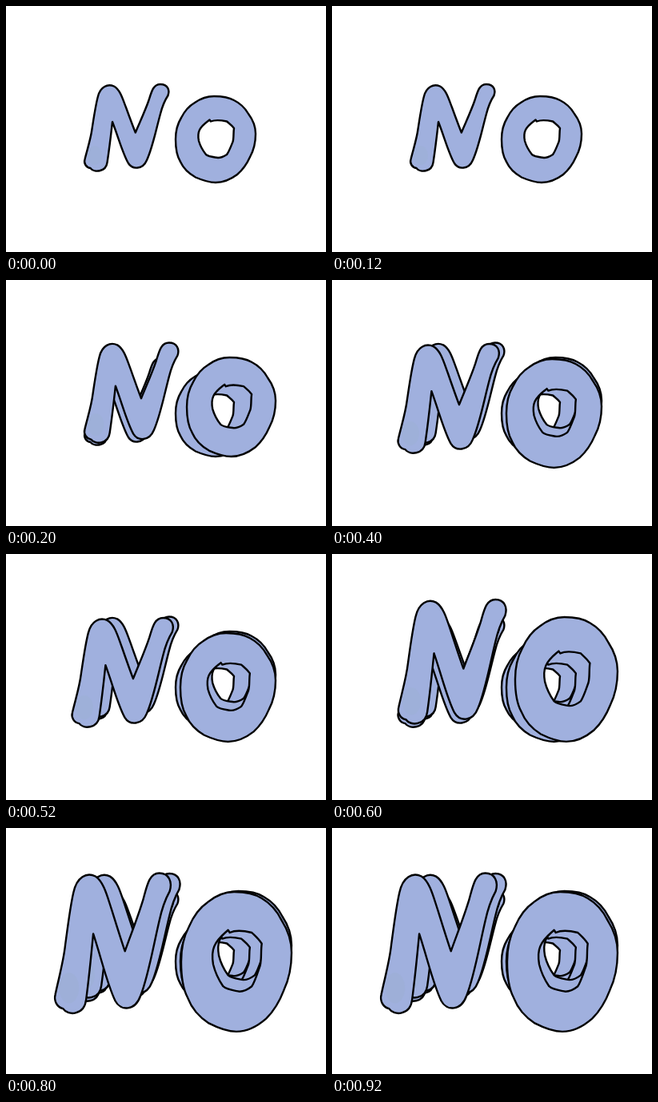
These frames come from a looping animation (400x308 px, 1 s). An HTML page:

```html
<!DOCTYPE html>
<html lang="en">
<head>
<meta charset="utf-8">
<title>NO</title>
<style>
  html, body { margin: 0; width: 100%; height: 100%; overflow: hidden; background: #fff; }
  svg { display: block; width: 100vw; height: 100vh; }
  .ink {
    fill: #a0b0de; fill-rule: evenodd;
    stroke: #000; stroke-width: 2.4; stroke-linejoin: round;
    vector-effect: non-scaling-stroke;
  }
  .smudge { fill: #9db0d6; opacity: .6; }
  .layer { animation: 1s step-end infinite; }
  .l1 { animation-name: at1; }
  .l2 { animation-name: at2; }
  .l3 { animation-name: at3; }
  .l4 { animation-name: at4; }
  @keyframes at1 { 0% { opacity: 0 } 20%, 100% { opacity: 1 } }
  @keyframes at2 { 0% { opacity: 0 } 40%, 100% { opacity: 1 } }
  @keyframes at3 { 0% { opacity: 0 } 60%, 100% { opacity: 1 } }
  @keyframes at4 { 0% { opacity: 0 } 80%, 100% { opacity: 1 } }
</style>
</head>
<body>
<svg viewBox="0 0 400 308" role="img" aria-label="NO">
  <defs>
    <g id="n">
      <path class="ink" d="M98.5 192 C102 178 106 166 107.5 154 C110 138 112 124 115 113 C118 101 127 97 135 100.5
        C143 105 146 117 150 127 C154 138 158 149 161.8 158.5 C167 146 174 131 178.5 118 C182 107 184 98 193 98
        C202 98 205 105 202.5 112 C198 119 195 127 193 135 C187 157 183 178 176 193 C171 205 158 205 153 197
        C146 185 141 166 133 145 C131 163 129 180 126.5 196 C125 208 110 209 105.5 203 C100 202 97 197 98.5 192Z"/>
      <ellipse class="smudge" cx="111" cy="187" rx="9" ry="12"/>
    </g>
    <path id="o" class="ink" d="M260 113 C270 113 278 114 285 118 C293 122 299 128 303 135 C309 143 312 151 312 160
      C312 171 310 180 305 189 C301 198 296 205 289 211 C281 217 272 221 262 221 C253 221 245 218 237 214.5
      C229 210 222 204 218 195 C213 187 212 177 212 167 C212 157 214 148 219 140 C223 132 229 125 236 121
      C243 116 251 113 260 113Z
      M254.5 142.5 L256 144.5 C262 142 269 143 276 144.5 C279 147 282 149 285 153 C284 159 285 165 283.5 170
      C281 176 279 182 276 186 C273 188 269 190 265 190 C259 189 254 189 250 186 C246 181 243 176 241 169
      C240 164 240 159 242 155 C245 149 250 146 254.5 142.5Z"/>
  </defs>
  <use href="#n"/>
  <use href="#o"/>
  <g class="layer l1">
    <use href="#n" transform="matrix(1.115 0 0 1.153 -11.4 -34.5)"/>
    <use href="#o" transform="matrix(1.11 0 0 1.148 -9.3 -32.7)"/>
  </g>
  <g class="layer l2">
    <use href="#n" transform="matrix(1.2 0 0 1.259 -35.2 -43.4)"/>
    <use href="#o" transform="matrix(1.19 0 0 1.259 -34.3 -43.3)"/>
  </g>
  <g class="layer l3">
    <use href="#n" transform="matrix(1.279 0 0 1.431 -42.6 -83.2)"/>
    <use href="#o" transform="matrix(1.28 0 0 1.444 -42.4 -84.2)"/>
  </g>
  <g class="layer l4">
    <use href="#n" transform="matrix(1.375 0 0 1.616 -73.8 -101.9)"/>
    <use href="#o" transform="matrix(1.38 0 0 1.62 -73.6 -103.1)"/>
  </g>
</svg>
</body>
</html>
```
